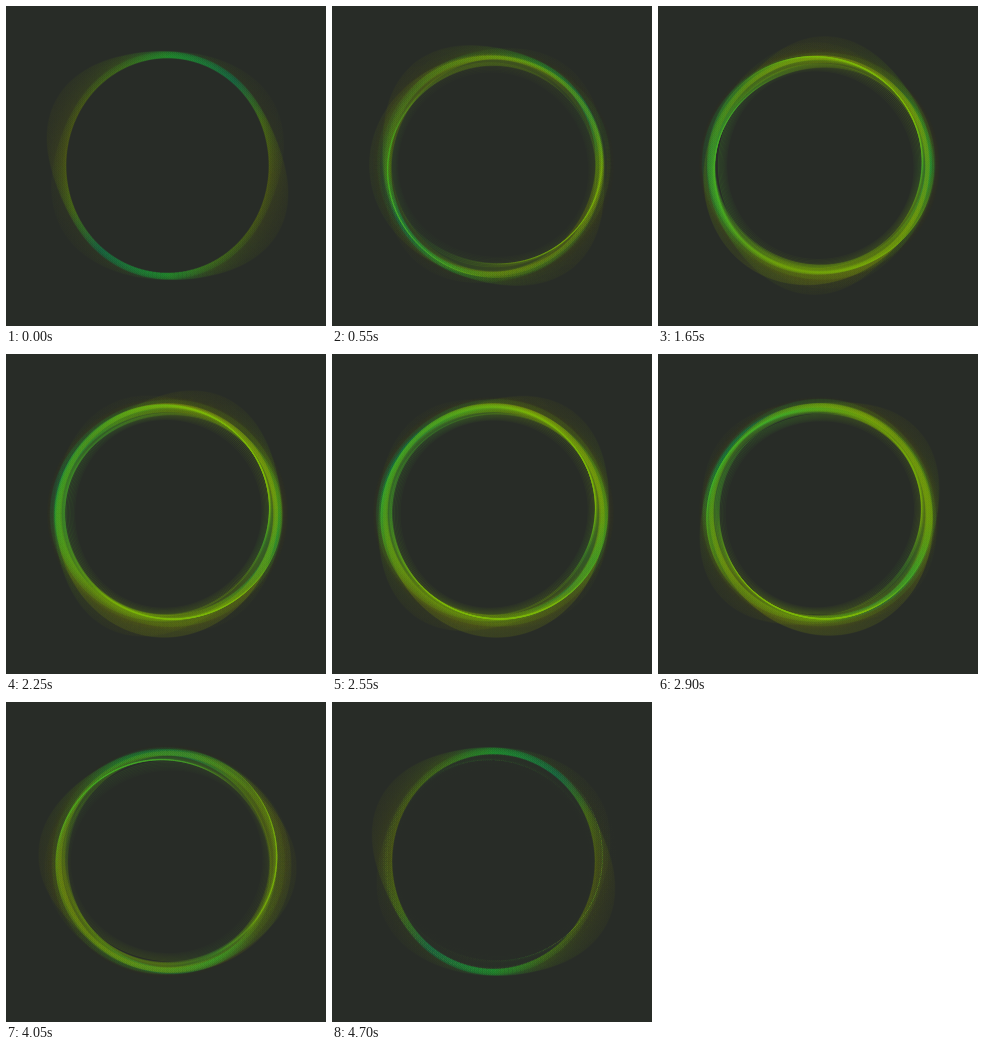
An HTML page with a canvas for the animation above (4750 ms loop, 320 by 320 pixels).

```html
<!DOCTYPE html>
<html lang="en">
<head>
<meta charset="utf-8">
<title>Woven ring</title>
<style>
  html, body { margin: 0; width: 100%; height: 100%; overflow: hidden; background: #282c27; }
  canvas { display: block; width: 100vw; height: 100vh; }
</style>
</head>
<body>
<canvas id="stage" width="320" height="320"></canvas>
<script>
const ctx = document.getElementById('stage').getContext('2d');
const LOOP = 4750, STEP = 50;
const CX = 161.5, CY = 159.5, POINTS = 180;
const { PI, sin, cos, pow } = Math;
const rad = deg => deg * PI / 180;

// 1 at the centre of a lobe, 0 between lobes
const bump = (angle, lobes, sharpness) => pow(0.5 + 0.5 * cos(lobes * angle), sharpness);

function sweep(start, stops) {
  const gradient = ctx.createConicGradient(start, CX, CY);
  for (const [deg, color] of stops) gradient.addColorStop(deg / 360, color);
  return gradient;
}

const twice = stops => [...stops, ...stops.map(([deg, color]) => [deg + 180, color]), [360, stops[0][1]]];

const OLIVE = 'rgb(100,110,8)', MOSS = 'rgb(80,130,15)';
const GREEN = 'rgb(25,165,50)', TEAL = 'rgb(8,125,80)';
const LIME = 'rgb(125,185,4)', LEAF = 'rgb(70,175,35)', AMBER = 'rgb(130,150,8)';
const RUST = 'rgb(110,95,15)';

const CLOCKWISE = twice([[0, OLIVE], [35, MOSS], [62, GREEN], [98, TEAL], [125, MOSS], [155, OLIVE]]);
const COUNTER = twice([[0, OLIVE], [70, MOSS], [118, GREEN], [145, MOSS]]);
const BRIGHT = [[0, LEAF], [35, LEAF], [85, LIME], [150, LIME], [180, LEAF], [210, LIME], [290, LIME], [335, LEAF], [360, LEAF]];
const WARM = [[0, MOSS], [60, AMBER], [300, AMBER], [360, MOSS]];
const COOL = [[0, TEAL], [40, GREEN], [80, MOSS], [160, MOSS], [180, GREEN], [205, MOSS], [300, MOSS], [360, TEAL]];

function weave({ count, color, width, alpha, radius }) {
  ctx.strokeStyle = color;
  ctx.lineWidth = width;
  for (let i = 0; i < count; i++) {
    const u = i / (count - 1);
    ctx.globalAlpha = alpha(u);
    ctx.beginPath();
    for (let k = 0; k < POINTS; k++) {
      const a = 2 * PI * k / POINTS, r = radius(a, u);
      ctx.lineTo(CX + r * cos(a), CY + r * sin(a));
    }
    ctx.closePath();
    ctx.stroke();
  }
}

function lobePair(phase, turn, height, strength, count, stops) {
  weave({
    count, width: 1.1,
    color: sweep(phase, stops),
    alpha: u => strength * (1 - 0.5 * u * u),
    radius: (a, u) => 104.5 + 6 * u
      + 3 * cos(2 * (a - phase - turn * rad(60)))
      + height * pow(u, 1.5) * bump(a - phase, 2, 2.6)
  });
}

function draw(p) {
  ctx.globalAlpha = 1;
  ctx.fillStyle = '#282c27';
  ctx.fillRect(0, 0, 320, 320);

  lobePair(rad(-30 - 180 * p), -1, 14, 0.05, 40, COUNTER);
  lobePair(rad(210 + 180 * p), 1, 20, 0.095, 56, CLOCKWISE);

  const glow = pow(sin(PI * p), 0.8);
  if (glow < 0.001) return;
  const spin = 2 * PI * p;
  const lobe = rad(208 - 233 * p);
  const tint = rad(140 + 120 * p);

  // soft outer rim
  weave({
    count: 8, width: 1,
    color: RUST,
    alpha: u => glow * 0.16 * (1 - 0.8 * u),
    radius: (a, u) => 112 + 6 * u + 2 * cos(2 * a)
  });

  // outer band, cool on one side
  weave({
    count: 24, width: 0.9,
    color: sweep(tint, COOL),
    alpha: u => glow * 0.15 * (1 - 0.4 * u),
    radius: (a, u) => 107 + 8 * u + 1.5 * cos(2 * a) + sin(3 * a + spin + 2 * u)
  });

  // single travelling lobe
  weave({
    count: 36, width: 0.9,
    color: sweep(tint, WARM),
    alpha: u => glow * 0.16 * (1 - 0.3 * u),
    radius: (a, u) => 106 + 4 * u + 14 * u * bump(a - lobe, 1, 4.5)
  });

  // bright core
  weave({
    count: 44, width: 0.8,
    color: sweep(tint, BRIGHT),
    alpha: u => glow * (0.14 + 0.14 * sin(PI * u)),
    radius: (a, u) => 101 + 10 * u + cos(2 * a)
      + 1.6 * sin(2 * a + spin + 5 * u) + 1.2 * sin(3 * a - spin + 4 * u)
  });

  // fine inner threads
  weave({
    count: 8, width: 0.6,
    color: sweep(tint, BRIGHT),
    alpha: u => glow * (0.4 - 0.32 * u),
    radius: (a, u) => 102 - 8 * u + cos(2 * a)
      + 1.4 * sin(2 * a - spin + u) + 0.9 * sin(3 * a + spin - u)
  });
}

let shown = -1;
function tick(now) {
  const step = Math.floor((now % LOOP) / STEP);
  if (step !== shown) {
    shown = step;
    draw(step * STEP / LOOP);
  }
  requestAnimationFrame(tick);
}
draw(0);
requestAnimationFrame(tick);
</script>
</body>
</html>
```
